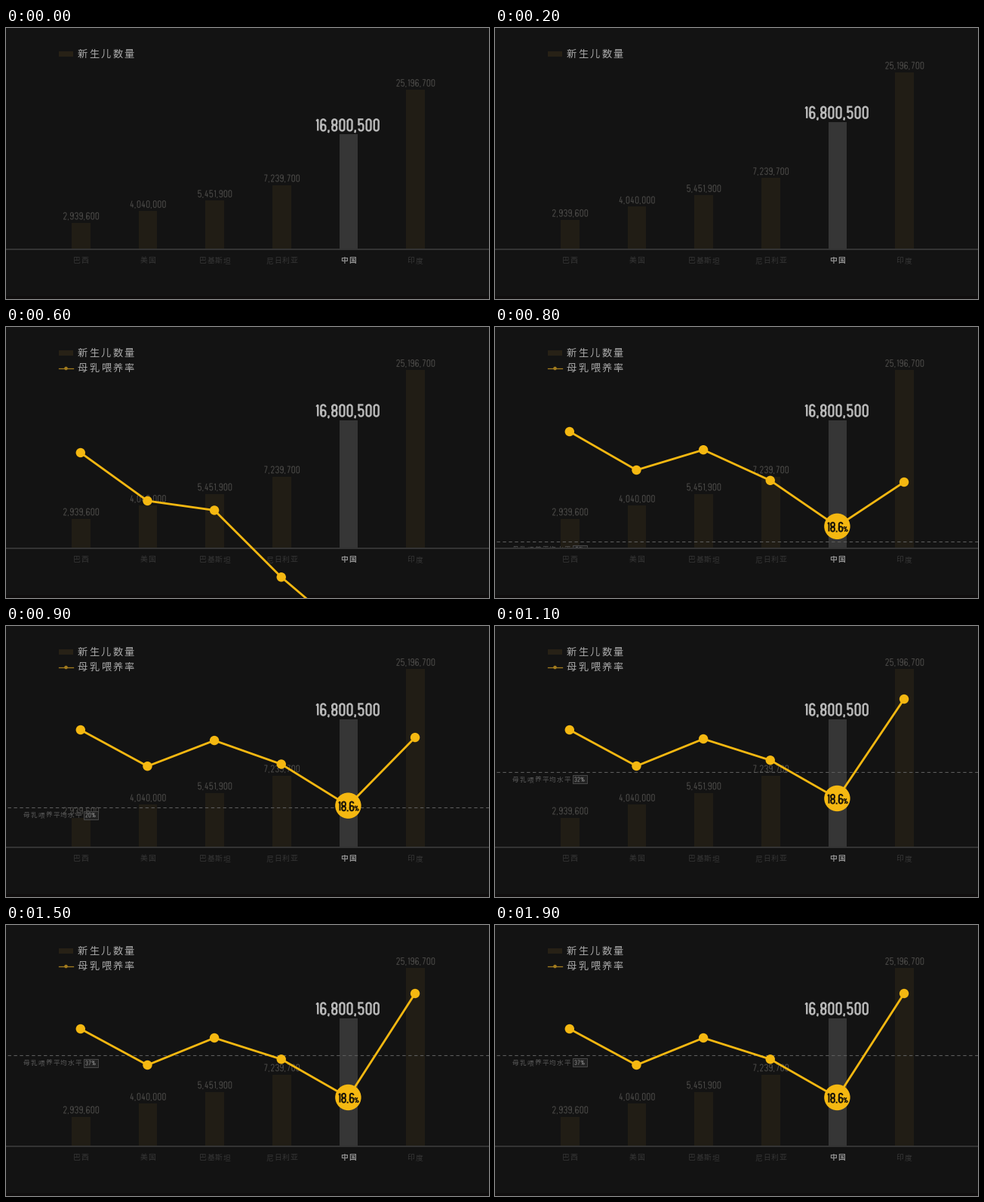
Recreate the animation shown at these times as a matplotlib script. Size 640 px wide and 360 px high, loop 2 s.

```python
import numpy as np
import matplotlib.pyplot as plt
from matplotlib.animation import FuncAnimation
from matplotlib.patches import Circle, PathPatch, Rectangle
from matplotlib.path import Path

W, H, DPI = 640, 360, 100
FRAMES, STEP = 20, 100
PX = 72 / DPI  # points per pixel

BG, AXIS, DIM, FAINT = "#131313", "#343434", "#454442", "#363636"
LIGHT, GOLD, GOLD_DIM = "#a9a9a9", "#f5b811", "#a37c1e"
BAR, BAR_HOT, SWATCH = "#211d15", "#363636", "#272116"
CJK = "Noto Sans CJK JP"

BASE = 294
COUNTRIES = ["巴西", "美国", "巴基斯坦", "尼日利亚", "中国", "印度"]
BIRTHS = ["2,939,600", "4,040,000", "5,451,900",
          "7,239,700", "16,800,500", "25,196,700"]
HEIGHTS = [39.5, 57, 72.5, 95.5, 170.5, 237]
XS = 99.3 + 88.65 * np.arange(6)
HOT = 4

# Rate points: resting height, time of arrival, strength of the rise
RATE_X = XS - 0.5
RATE_Y = np.array([138, 186, 150, 178.3, 229, 91])
ARRIVE = np.array([0.896, 0.962, 1.017, 1.044, 1.082, 1.28])
RISE = np.array([1118, 948, 1289, 1759, 1598, 1040])

fig = plt.figure(figsize=(W / DPI, H / DPI), dpi=DPI, facecolor=BG)
ax = fig.add_axes([0, 0, 1, 1])


def arc(cx, cy, r, start, end):
    a = np.radians(np.linspace(start, end, 13))
    return list(zip(cx + r * np.cos(a), cy + r * np.sin(a)))


def glyph(ch, h, s):
    """Strokes of one condensed character and its outer width."""
    a, b = 0.48 * h - s, h - s
    r, m = a / 2, b / 2

    def bow(cy, start, end):
        return arc(r, cy, r, start, end)

    def ring(top, bottom):
        loop = bow(top + r, 180, 360) + bow(bottom - r, 0, 180)
        return loop + loop[:2]

    wide = 0.48 * h
    if ch == "0":
        lines = [ring(0, b)]
    elif ch == "1":
        wide = 0.25 * h
        w = wide - s
        lines = [[(0, 0.16 * b), (w, 0), (w, b)]]
    elif ch == "2":
        lines = [bow(r, 180, 360) + [(a, 0.32 * b), (0, b), (a, b)]]
    elif ch == "3":
        lines = [bow(r, 180, 360) + bow(m - r, 0, 90)
                 + bow(m + r, 270, 360) + bow(b - r, 0, 180)]
    elif ch == "4":
        lines = [[(0.55 * a, 0), (0, 0.74 * b), (a, 0.74 * b)],
                 [(0.75 * a, 0.42 * b), (0.75 * a, b)]]
    elif ch == "5":
        lines = [[(a, 0), (0, 0), (0, 0.47 * b)]
                 + bow(0.38 * b + r, 200, 360) + bow(b - r, 0, 180)]
    elif ch in "69":
        lines = [ring(0.46 * b, b), bow(r, 360, 180) + [(0, b - r)]]
        if ch == "9":
            lines = [[(a - x, b - y) for x, y in ln] for ln in lines]
    elif ch == "7":
        lines = [[(0, 0), (a, 0), (0.3 * a, b)]]
    elif ch == "8":
        lines = [ring(0, m), ring(m, b)]
    elif ch == "%":
        wide, q = 0.8 * h, 0.15 * h
        w = wide - s
        lines = [arc(q, q + 0.05 * h, q, 0, 375),
                 arc(w - q, b - q - 0.05 * h, q, 0, 375),
                 [(0.75 * w, 0), (0.25 * w, b)]]
    else:
        wide = 0.17 * h
        lines = [[(0, b - 0.5 * s), (0, b + 0.5 * s)]]
        if ch == ",":
            lines[0].append((-0.3 * s, b + 1.1 * s))
    return lines, wide


def number(text, x, cy, h, s, gap, color, z=3, left=False):
    """Condensed figures, centred on x or starting there."""
    parts = [glyph(c, h, s) for c in text]
    total = sum(w for _, w in parts) + gap * (len(parts) - 1)
    if not left:
        x -= total / 2
    top = cy - h / 2 + s / 2
    paths = []
    for lines, w in parts:
        paths += [Path(np.array(ln) + (x + s / 2, top)) for ln in lines]
        x += w + gap
    ax.add_patch(PathPatch(Path.make_compound_path(*paths), fc="none",
                           ec=color, lw=s * PX, capstyle="butt",
                           joinstyle="miter", zorder=z))


def spaced(text, x, cy, size, step, color, z=3, **style):
    """CJK text set with letter spacing; x is the first character's centre."""
    for k, ch in enumerate(text):
        ax.text(x + k * step, cy + 0.38 * size, ch, family=CJK, color=color,
                fontsize=size * PX, ha="center", va="baseline", zorder=z,
                **style)


def box(x, y, w, h, fill, z=1, edge="none", lw=0.0):
    ax.add_patch(Rectangle((x, y), w, h, fc=fill, ec=edge, lw=lw * PX,
                           zorder=z))


def line(xs, ys, color, width, z, **style):
    ax.plot(xs, ys, color=color, lw=width * PX, zorder=z, **style)


def dot(x, y, r, color, z, **style):
    ax.add_patch(Circle((x, y), r, fc=color, ec="none", zorder=z, **style))


def draw_bars(t):
    grow = 1 - 0.105 * max(0, 1 - t / 0.34) ** 3
    for i, x in enumerate(XS):
        h = HEIGHTS[i] * grow
        hot = i == HOT
        box(x - 12.25, BASE - h, 24.5, h, BAR_HOT if hot else BAR)
        if hot:
            number(BIRTHS[i], x - 1.4, BASE - h - 12.5, 17.5, 2.4, 1.75,
                   "#b8b8b8")
        else:
            number(BIRTHS[i], x + 0.2, BASE - h - 9, 10, 1.1, 1.3, DIM)


def draw_floor():
    box(0, BASE, W, H - BASE, BG, z=4)
    box(0, 355.5, W, 5, "#100e0e", z=4)
    box(0, BASE - 1, W, 2, AXIS, z=5)
    for i, name in enumerate(COUNTRIES):
        first = XS[i] - 0.2 - 10.6 * (len(name) - 1) / 2
        hot = i == HOT
        spaced(name, first, 308.7, 9.8, 10.6, "#8e8e8e" if hot else FAINT,
               z=5, weight="bold" if hot else "normal")


def draw_legend(t):
    box(70, 30.5, 19, 7, SWATCH)
    spaced("新生儿数量", 101.3, 34, 13.2, 15.5, LIGHT, weight="medium")
    fade = float(np.clip((t - 0.2) / 0.25, 0, 1))
    if fade > 0:
        line([70, 89], [55, 55], GOLD_DIM, 1.3, 2, alpha=fade)
        dot(79.5, 55, 2.3, GOLD_DIM, 3, alpha=fade)
        spaced("母乳喂养率", 101.3, 54.3, 13.2, 15.5, LIGHT, weight="medium",
               alpha=fade)


def draw_average(t):
    u = np.clip((t - 0.784) / 1.07, 0, 1)
    if u == 0:
        return
    p = 1 - (1 - u) ** 5
    y = BASE - 121.3 * p
    line([2, W], [y, y], "#5c5c5c", 1.1, 3, dashes=(4, 3.2))
    spaced("母乳喂养平均水平", 26.8, y + 10, 8.6, 9.9, "#555555")
    box(102.5, y + 4.5, 19, 11, "#222222", 3, "#474747", 1)
    number(f"{round(37 * p ** 0.75)}%", 112, y + 10, 6.8, 0.9, 0.8,
           "#707070", z=3.5)


def draw_rate(t):
    ys = RATE_Y + RISE * np.maximum(0, ARRIVE - t) ** 3
    line(RATE_X, ys, GOLD, 2.8, 7, solid_joinstyle="round")
    for i, (x, y) in enumerate(zip(RATE_X, ys)):
        dot(x, y, 17.2 if i == HOT else 6.2, GOLD, 8)
    x, y = RATE_X[HOT], ys[HOT]
    ink = "#1b1508"
    number("18.6", x - 13.4, y + 0.8, 13.8, 2.0, 0.8, ink, z=9, left=True)
    number("%", x + 7.9, y + 3.6, 8, 1.1, 0, ink, z=9, left=True)


def draw(i):
    t = i * STEP / 1000
    ax.clear()
    ax.set(xlim=(0, W), ylim=(H, 0))
    ax.axis("off")
    draw_bars(t)
    draw_average(t)
    draw_floor()
    draw_legend(t)
    draw_rate(t)
    return []


anim = FuncAnimation(fig, draw, frames=FRAMES, interval=STEP,
                     init_func=lambda: [], repeat=True, repeat_delay=0)
plt.show()
```
